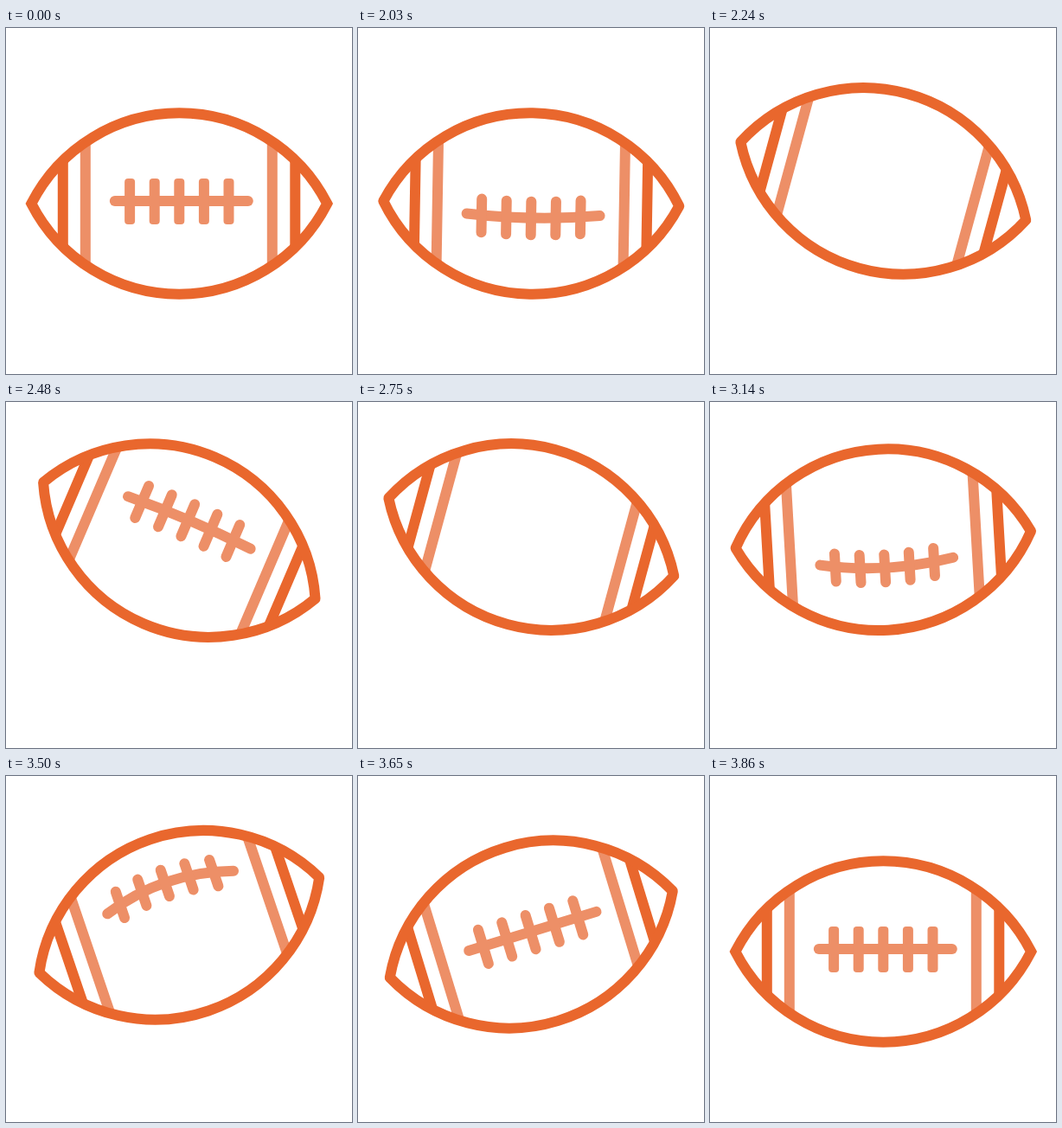
Animation of 400 by 400 pixels, one loop 3.89 s. Source, as an HTML page:

```html
<!DOCTYPE html>
<html lang="en">
<head>
<meta charset="utf-8">
<title>Spinning football</title>
<style>
  html, body { margin: 0; width: 100%; height: 100%; overflow: hidden; background: #fff; }
  svg { display: block; width: 100vw; height: 100vh; }
  .dark, .light { fill: none; stroke-width: 12; }
  .dark { stroke: #e9672d; }
  .light { stroke: #ed8f67; }
  .tick { fill: #ed8f67; }
</style>
</head>
<body>
<svg viewBox="0 0 400 400">
  <defs>
    <path id="shape" d="M-171 0A192 192 0 0 1 171 0A192 192 0 0 1 -171 0Z"/>
    <clipPath id="inside"><use href="#shape"/></clipPath>
  </defs>
  <g id="ball">
    <g clip-path="url(#inside)">
      <path class="light" d="M-108.5 -130V130M107.5 -130V130"/>
      <path class="dark" d="M-134.5 -130V130M134 -130V130"/>
      <g id="laces"><path id="seam" class="light" stroke-linecap="round"/></g>
    </g>
    <use id="outline" class="dark" href="#shape"/>
  </g>
</svg>
<script>
const LOOP = 3890, START = 2030, END = 3860, STEP = 30;
const TURNS = [2000, 2515, 3091, 3565];   // the ball faces front at these times
const HALF = 77;                          // half the length of the seam

const $ = id => document.getElementById(id);
const ball = $('ball'), laces = $('laces'), seam = $('seam'), outline = $('outline');
const ticks = [-2, -1, 0, 1, 2].map(i => {
  const el = document.createElementNS('http://www.w3.org/2000/svg', 'rect');
  set(el, { class: 'tick', x: 28.6 * i - 6, width: 12 });
  laces.append(el);
  return { x: 28.6 * i, el };
});

function set(el, attrs) {
  for (const key in attrs) el.setAttribute(key, attrs[key]);
}

// Paused animation of one property; each key is [time, value, easing to the next key]
function animate(property, keys) {
  const frames = keys.map(([time, value, curve]) => ({
    offset: time / LOOP,
    [property]: value,
    easing: curve ? `cubic-bezier(${curve})` : 'linear'
  }));
  const first = { ...frames[0], offset: 0, easing: 'linear' };
  const last = { ...frames[frames.length - 1], offset: 1 };
  const animation = ball.animate([first, ...frames, last], { duration: LOOP, fill: 'both' });
  animation.pause();
  return animation;
}

const motion = [
  animate('translate', [
    [2030, '200.3px 203px', '.25,.2,.2,1'],
    [2770, '200.3px 156px', '.62,0,.8,.55'],
    [3860, '200.3px 203px']
  ]),
  animate('rotate', [
    [2000, '0deg', '.4,.2,.6,1'],
    [2440, '23.8deg', '.4,.15,.75,.95'],
    [3575, '-20deg', '.4,0,.6,1'],
    [3860, '0deg']
  ])
];

// Roll about the long axis in radians: every turn starts and ends at half speed
function roll(t) {
  const i = TURNS.findIndex((from, k) => t >= from && t < TURNS[k + 1]);
  if (i < 0) return 0;
  const angle = 2 * Math.PI * (t - TURNS[i]) / (TURNS[i + 1] - TURNS[i]);
  return angle - Math.sin(angle) / 2;
}

function drawLaces(angle, resting) {
  const y = 105 * Math.sin(angle) - 3;
  const sag = y > 0 ? 0.23 * y : 0.4 * Math.min(0, y + 20);
  const squash = Math.min(1, (sag / 7.5) ** 2);
  const half = 26.5 - 4.5 * squash;
  const curve = x => y - sag * (x / HALF) ** 2;

  laces.style.display = Math.cos(angle) > 0 ? '' : 'none';
  const ends = curve(HALF);
  set(seam, { d: `M-74.5 ${ends}Q2.5 ${2 * y - ends} 79.5 ${ends}` });
  for (const { x, el } of ticks) {
    set(el, { y: curve(x) - half + 0.5, height: 2 * half, rx: resting ? 4 : 6 });
  }
}

function draw(time) {
  const resting = time < START || time >= END;
  const t = resting ? END : START + Math.floor((time - START) / STEP) * STEP;
  for (const animation of motion) animation.currentTime = t;
  set(outline, { 'stroke-linejoin': resting ? 'miter' : 'round' });
  drawLaces(roll(t), resting);
}

function frame() {
  draw(performance.now() % LOOP);
  requestAnimationFrame(frame);
}
frame();
</script>
</body>
</html>
```
